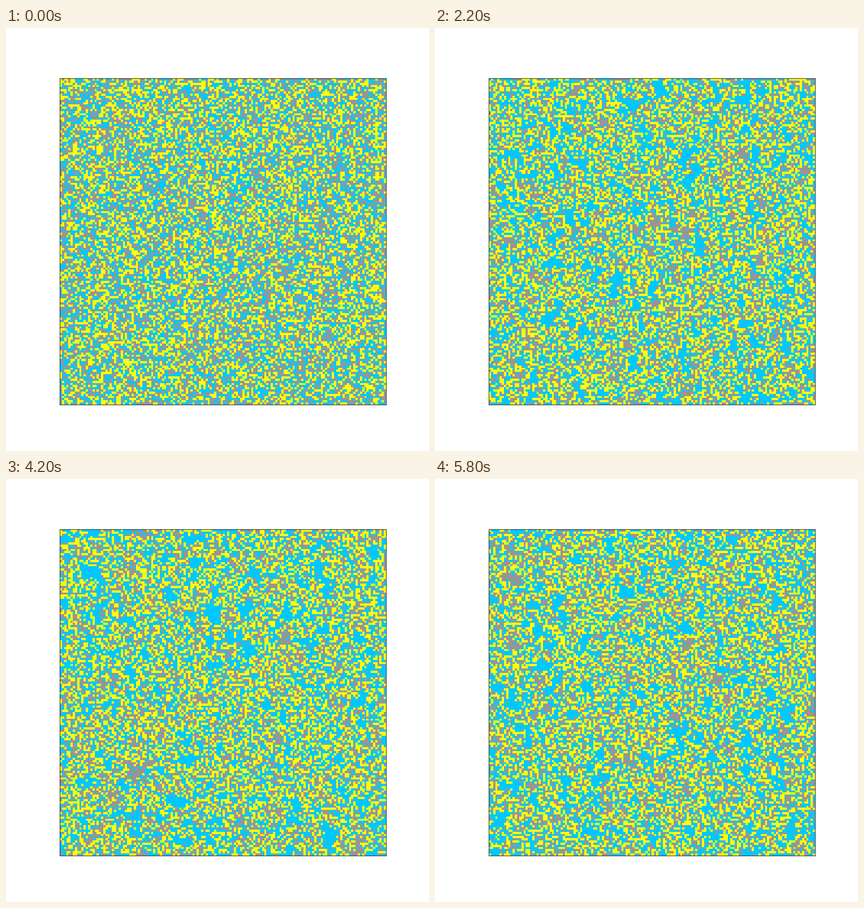
These frames come from a looping animation (748 px wide and 748 px high, 6 s). A matplotlib script:

```python
import matplotlib.pyplot as plt
import numpy as np
from matplotlib.animation import FuncAnimation
from matplotlib.colors import ListedColormap

N = 150
FRAMES = 30
STAGE = 748
LEFT, BOTTOM, SIDE = 95.47, 82.37, 576.58
REST, DECAY, ACTIVE = 0, 1, 2
COLORS = ["#00c8ff", "#969696", "#ffff00"]

rng = np.random.default_rng(42)
seeds = rng.standard_normal((FRAMES + 4, N, N))
freq = np.fft.fftfreq(N)
F2 = freq[:, None] ** 2 + freq[None, :] ** 2


def gauss(sigma):
    return np.exp(-2 * np.pi ** 2 * sigma ** 2 * F2)


def shape_noise(noise, spectrum):
    """Filter noise on a torus and scale it to unit spread."""
    out = np.fft.ifft2(np.fft.fft2(noise) * spectrum).real
    return out / out.std()


def start_grid():
    return np.random.default_rng(7).integers(0, 3, (N, N))


def grid_at(step):
    if step == 0:
        return start_grid()
    local = np.random.default_rng(1000 + step)
    fine, grain = local.standard_normal((2, N, N))

    # Pockets drift over a few steps; the fine texture is new each time.
    w = seeds[step:step + 3]
    pocket = shape_noise(0.6 * w[0] + w[1] + 0.6 * w[2], gauss(1.3))
    pocket *= min(1, 0.7 + 0.15 * step)
    core = np.maximum(pocket - 1, 0)

    # Thin active strands that avoid the pockets.
    strand = shape_noise(fine, gauss(0.3) * (1 - gauss(1.0)))
    strand -= 2.4 * core + 1.1 * np.maximum(-pocket - 1.3, 0)
    active = strand > np.quantile(strand, 0.655)

    tone = 0.5 * pocket + core + 0.9 * grain
    rest = tone > np.quantile(tone[~active], 0.41)
    return np.where(active, ACTIVE, np.where(rest, REST, DECAY))


fig = plt.figure(figsize=(STAGE / 100, STAGE / 100), dpi=100)
ax = fig.add_axes([v / STAGE for v in (LEFT, BOTTOM, SIDE, SIDE)])
img = ax.imshow(start_grid(), cmap=ListedColormap(COLORS), vmin=0, vmax=2,
                interpolation="nearest", aspect="auto")
ax.set_xticks([])
ax.set_yticks([])
for spine in ax.spines.values():
    spine.set_linewidth(0.576)


def update(i):
    # The opening grid is held for two ticks.
    img.set_data(grid_at(max(i - 1, 0)))
    return [img]


anim = FuncAnimation(fig, update, frames=FRAMES, interval=200,
                     repeat=True, repeat_delay=0)
plt.show()
```
